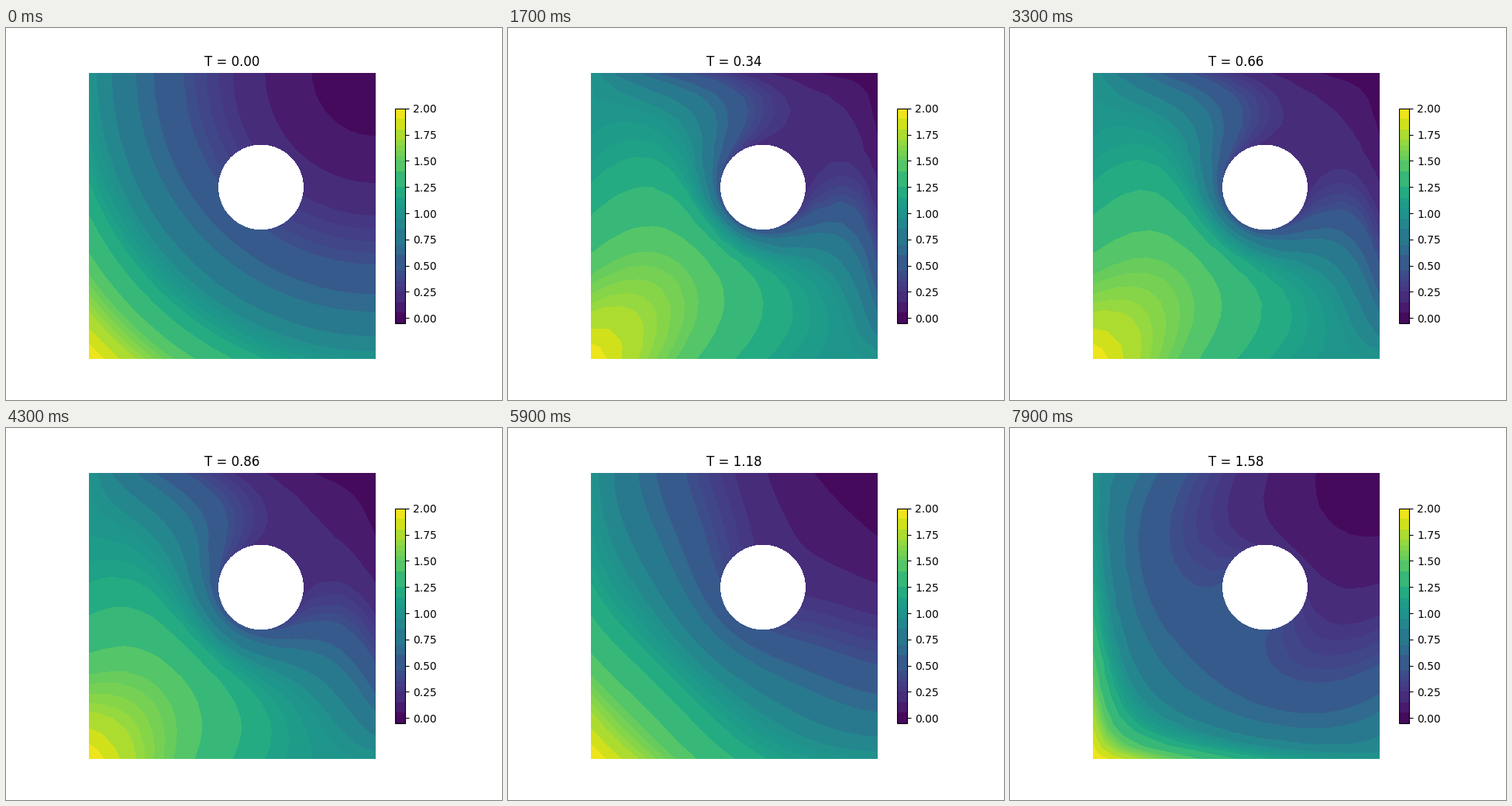
Recreate the animation shown at these times as a matplotlib script. Size 640x480 px, loop 8 s.

```python
import numpy as np
import matplotlib.pyplot as plt
from matplotlib.animation import FuncAnimation
from matplotlib.tri import Triangulation

STEPS, DT = 80, 0.02
DIFFUSION, SPEED, OMEGA = 0.1, 1.0, 1.65
CENTER, RADIUS, RING = 0.6, 0.15, 56
LEVELS = [-0.05, 0.05, 0.15, 0.25, 0.3, 0.35, 0.4, 0.45, 0.6, 0.7, 0.85, 0.95,
          1.0, 1.05, 1.1, 1.15, 1.25, 1.4, 1.5, 1.55, 1.6, 1.65, 1.7, 1.8,
          1.9, 2.0]


def ring(radius, count, shift=0.0):
    a = 2 * np.pi * (np.arange(count) + shift) / count
    return CENTER + radius * np.column_stack([np.cos(a), np.sin(a)])


def build_mesh(n=18):
    """Unstructured triangles on the unit square with a round hole."""
    rng = np.random.default_rng(4)
    s = np.arange(n) / n
    zero, one = np.zeros(n), np.ones(n)
    sides = np.vstack([np.column_stack(p) for p in
                       ((s, zero), (one, s), (1 - s, one), (zero, 1 - s))])
    h = 1 / n
    rows = []
    for j, y in enumerate(np.arange(h * 0.87, 1 - h / 2, h * 0.87)):
        x = np.arange(h * (1 if j % 2 else 0.5), 1 - h / 3, h)
        rows.append(np.column_stack([x, np.full_like(x, y)]))
    inner = np.vstack(rows)
    inner += rng.uniform(-0.18, 0.18, inner.shape) * h
    far = np.hypot(*(inner - CENTER).T) > RADIUS + 0.075
    inside = (inner.min(axis=1) > 0.4 * h) & (inner.max(axis=1) < 1 - 0.4 * h)
    pts = np.vstack([ring(RADIUS, RING), sides,
                     ring(RADIUS + 0.018, RING, 0.5),
                     ring(RADIUS + 0.045, 36), inner[far & inside]])
    mesh = Triangulation(pts[:, 0], pts[:, 1])
    mesh.set_mask((mesh.triangles < RING).all(axis=1))
    fixed = np.arange(len(pts)) < RING + 4 * n
    return mesh, fixed


def assemble(mesh):
    """Mass, stiffness and diagonal transport matrices for linear elements."""
    tri = mesh.get_masked_triangles()
    x, y = mesh.x[tri], mesh.y[tri]
    b = np.roll(y, -1, axis=1) - np.roll(y, -2, axis=1)
    c = np.roll(x, -2, axis=1) - np.roll(x, -1, axis=1)
    det = (x * b).sum(axis=1)
    ok = np.abs(det) > 1e-10
    tri, b, c, det = tri[ok], b[ok], c[ok], det[ok]
    area = np.abs(det) / 2
    gx, gy = b / det[:, None], c / det[:, None]
    n = len(mesh.x)
    mass, stiff, flow = (np.zeros((n, n)) for _ in range(3))
    for i in range(3):
        for j in range(3):
            at = (tri[:, i], tri[:, j])
            np.add.at(mass, at, area / (6 if i == j else 12))
            np.add.at(stiff, at, area * (gx[:, i] * gx[:, j] + gy[:, i] * gy[:, j]))
            np.add.at(flow, at, area / 3 * (gx[:, j] + gy[:, j]))
    return mass, stiff, flow


def solve(mesh, fixed):
    """Implicit Euler for heat carried back and forth along the diagonal."""
    mass, stiff, flow = assemble(mesh)
    start = (1 - mesh.x) ** 2 + (1 - mesh.y) ** 2
    free = ~fixed
    states = [start]
    for k in range(1, STEPS):
        v = SPEED * np.cos(OMEGA * k * DT)
        system = mass + DT * (DIFFUSION * stiff + v * flow)
        rhs = mass @ states[-1] - system[:, fixed] @ start[fixed]
        u = start.copy()
        u[free] = np.linalg.solve(system[np.ix_(free, free)], rhs[free])
        states.append(u)
    return np.clip(states, -0.04, 2.0)


mesh, fixed = build_mesh()
states = solve(mesh, fixed)

fig, ax = plt.subplots(figsize=(6.4, 4.8), dpi=100)
ax.set_aspect("equal")
ax.axis("off")


def fill(k):
    cs = ax.tricontourf(mesh, states[k], levels=LEVELS, cmap="viridis")
    ax.set_xlim(0, 1)
    ax.set_ylim(0, 1)
    return cs


shown = [fill(0)]
bar = fig.colorbar(shown[0], ax=ax, shrink=0.75, spacing="proportional",
                   ticks=np.arange(0, 2.01, 0.25), format="%.2f")
bar.minorticks_off()
title = ax.set_title("T = 0.00")


def draw(k):
    shown.pop().remove()
    shown.append(fill(k))
    title.set_text(f"T = {k * DT:.2f}")
    return shown[0], title


anim = FuncAnimation(fig, draw, frames=STEPS, interval=100, repeat=True,
                     repeat_delay=0, blit=False)
plt.show()
```
